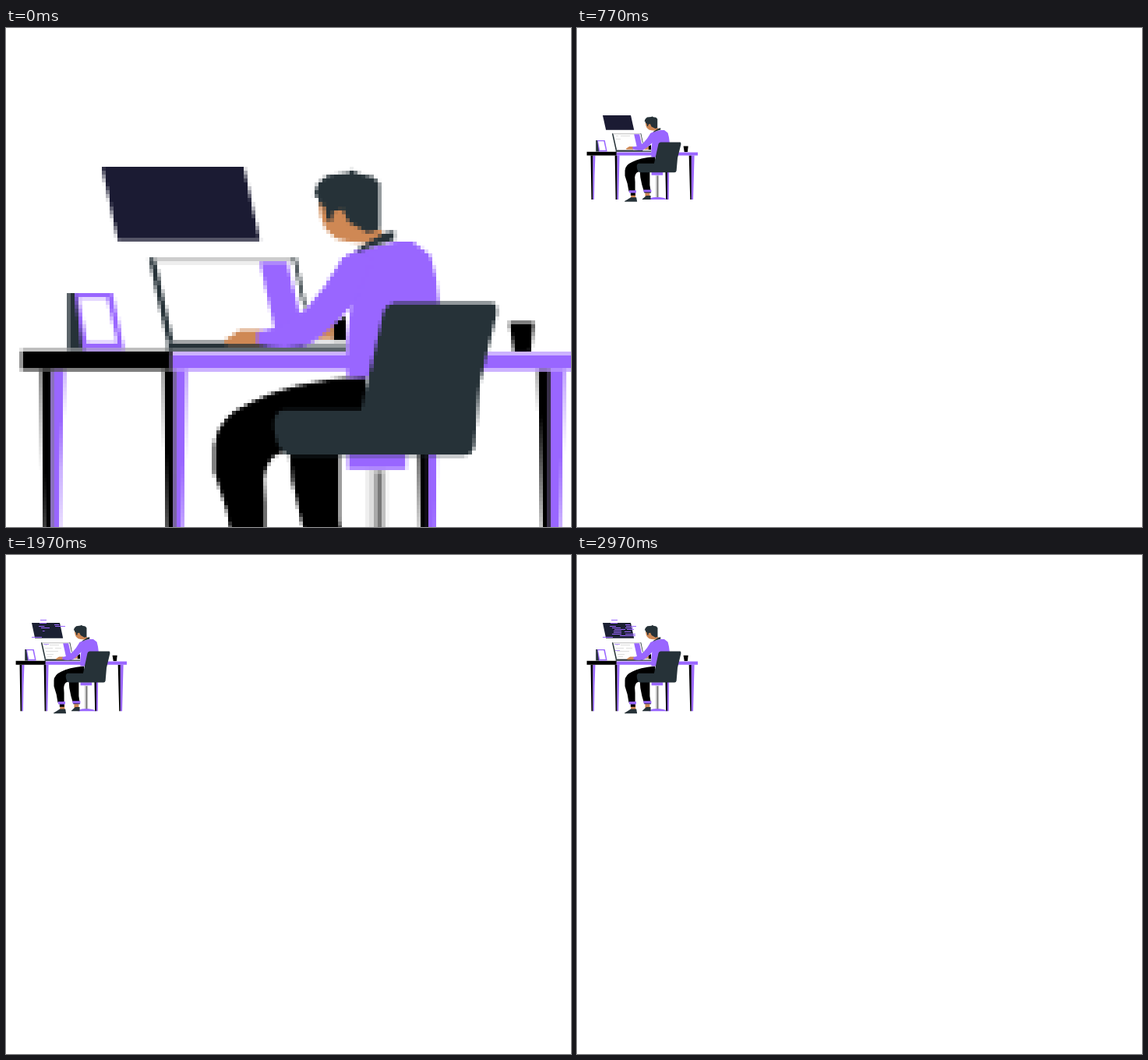
An HTML page with a canvas for the animation above (3.01 s loop, 725 by 640 pixels).

```html
<!DOCTYPE html>
<html lang="en">
<head>
<meta charset="utf-8">
<title>Working at a desk</title>
<style>
html, body { margin: 0; width: 100%; height: 100%; overflow: hidden; background: #fff; }
canvas { display: block; }
</style>
</head>
<body>
<canvas id="stage" width="725" height="640"></canvas>
<script>
const LOOP = 3010, CLOSE_UP = 30, LIFT = 1500;
const ZOOM = 5.05, OFF_X = 43.6, OFF_Y = 387.6;
const PURPLE = '#9966ff', DARK = '#263238', BLACK = '#000', SKIN = '#cf8854', NAVY = '#1b1b33';

const stage = document.getElementById('stage').getContext('2d');
const small = document.createElement('canvas');
small.width = 165;
small.height = 230;
const ctx = small.getContext('2d');

const fill = (color, d) => {
  ctx.fillStyle = color;
  ctx.fill(new Path2D(d));
};
const clamp = v => Math.max(0, Math.min(1, v));

// Shapes use close-up coordinates; once lifted, a group moves up and stretches from its anchor.
function group(lifted, anchor, rise, stretch, draw) {
  ctx.save();
  ctx.setTransform(1 / ZOOM, 0, 0, 1 / ZOOM, OFF_X / ZOOM, OFF_Y / ZOOM);
  if (lifted) {
    ctx.translate(0, anchor - rise);
    ctx.scale(1, stretch);
    ctx.translate(0, -anchor);
  }
  draw();
  ctx.restore();
}

// x, y, width in small pixels, start time
const codeLines = [
  [44, 83, 8, 1480], [33, 105, 13, 1480], [62, 89, 6, 1530],
  [43, 87, 9, 1620], [45, 93, 11, 1700], [63, 91, 13, 1780],
  [42, 91, 8, 1860], [47, 97, 10, 1940], [62, 101, 13, 2020],
  [53, 95, 9, 2100], [64, 95, 9, 2180], [61, 98, 8, 2260],
  [45, 101, 12, 2400], [62, 93, 10, 2500], [55, 103, 20, 2600],
  [47, 99, 10, 2700], [48, 95, 7, 2780]
];
const pageLines = [
  [56, 138, 12, 450], [50, 138, 3, 570], [50, 142, 10, 700], [63, 142, 8, 800],
  [51, 146, 16, 920], [52, 150, 9, 1100], [53, 153, 6, 1350]
];

function lines(list, t, color, shift = 0) {
  ctx.fillStyle = color;
  for (const [x, y, w, start] of list) {
    ctx.fillRect(x, y - shift, w * clamp((t - start) / 120), 1);
  }
}

function monitor(lifted) {
  group(lifted, 178, 126, 1.05, () =>
    fill(lifted ? '#1b2033' : NAVY, 'M123 178H305L326 273H144Z'));
}

function desk() {
  fill(BLACK, 'M45 438H60V723H50ZM202 438H217V723H207ZM527 438H542V723H533ZM682 438H698V723H690Z');
  fill(PURPLE, 'M60 438H75L70 570L67 723H60ZM217 438H232L225 723H217ZM542 438H554L551 723H542ZM698 438H717L709 723H698Z');
  fill(BLACK, 'M20 414H213V438H20Z');
  fill(PURPLE, 'M213 418H739V438H213Z');
}

function stool() {
  fill('#dddddd', 'M464 565H488V712H464Z');
  fill('#777777', 'M474 569H483V712H474Z');
  fill(PURPLE, 'M439 546H513V565H439ZM421 723Q430 710 464 708H490Q530 711 538 723Z');
}

function legs() {
  fill(SKIN, 'M398 680H428V704H398ZM306 683H336V714H306Z');
  fill(DARK, 'M380 720Q392 710 406 698H434V723H380ZM265 733Q285 724 305 710H341L346 737H265Z');
  fill(BLACK, 'M364 540H428V630L436 680H393Q375 630 367 580ZM304 670H334V697H304Z');
  fill(BLACK, 'M462 446Q360 455 315 480Q268 500 267 535V570L283 620L292 670H333V610L331 580Q334 550 352 545L462 490Z');
  fill(PURPLE, 'M387 660H438V676H389ZM293 664H340V681H296Z');
}

function deskItems() {
  fill(DARK, 'M79 339H92L102 413H79Z');
  fill(PURPLE, 'M88 339H137L152 413H98Z');
  fill('#fff', 'M93 346H130L143 404H104Z');
  fill(BLACK, 'M646 378H677L673 415H652Z');
}

function laptop() {
  fill('#fff', 'M188 298H370L390 404H212Z');
  fill(DARK, 'M183 295H191L215 404H207ZM364 295H372L386 362L380 352L369 301Z');
  fill('#bdbdbd', 'M190 295H368V300H190ZM213 400H320V404H213Z');
  fill(PURPLE, 'M326 300H361L385 404H349Z');
  fill(DARK, 'M207 404H438V414H207Z');
}

function farHand(k) {
  fill(BLACK, 'M417 380L436 370V402H420Z');
  fill('#f5f5f5', 'M382 402H438V408H382Z');
  const x = -12 * k;
  fill(SKIN, `M${398 + x} 399L${412 + x} 382L420 378V399Z`);
}

function body(k) {
  fill(PURPLE, 'M455 284L500 274H522L545 292L552 320L557 360L480 448H438V398L443 355L430 297Z');
  const dx = -12 * k, dy = -19 * k;
  fill(SKIN, `M${279 + dx} ${402 + dy}L${300 + dx} ${388 + dy}H${328 + dx}V${407 + dy}H${283 + dx}Z`);
  fill(PURPLE, `M455 284L432 296L410 330L${385 - 4 * k} 360L${348 + dx / 2} ${384 + dy * .7}L${322 + dx} ${390 + dy}V${405 + dy}` +
    `Q${350 + dx / 2} ${414 + dy * .6} ${385 - 2 * k} ${408 - 14 * k}Q410 ${395 - 12 * k} 446 353L470 300Z`);
}

function head(k) {
  ctx.save();
  ctx.translate(-3 * k, 4 * k);
  fill(SKIN, 'M401 224H425L455 245L482 260L484 266L465 276L440 274L424 270L410 257L404 243Z');
  fill(DARK, 'M400 200L412 189L440 186L444 182L452 187L470 190L479 200V258L465 262L440 249L432 232L420 235L418 248L412 246L409 229L401 225V218L395 215Z');
  ctx.restore();
  fill(DARK, 'M449 285L470 272L485 262L498 260V272L470 280L455 287Z');
}

function chair() {
  fill(DARK, 'M498 352H626Q631 354 630 366L608 455L601 537Q599 548 588 548H367Q347 546 344 512Q343 491 358 490H456L484 364Q487 353 498 352Z');
}

function drawScene(t) {
  const lifted = t >= LIFT;
  const k = (1 - Math.cos(t / LOOP * 6 * Math.PI)) / 2;
  const upper = draw => group(lifted, 415, 116, 1, draw);
  const lower = draw => group(lifted, 415, 116, 1.055, draw);

  ctx.clearRect(0, 0, small.width, small.height);
  ctx.fillStyle = '#fff';
  ctx.fillRect(0, 0, small.width, small.height);
  monitor(lifted);
  if (lifted) lines(codeLines, t, PURPLE);
  lower(() => { desk(); stool(); legs(); });
  upper(() => { deskItems(); laptop(); });
  const shift = lifted ? 23 : 0;
  lines(pageLines, t, '#dedede', shift);
  lines([[48, 137, 7, 950], [49, 145, 6, 2500]], t, '#b99aff', shift);
  upper(() => { farHand(k); body(k); head(k); });
  group(lifted, 350, 116, 1.03, chair);
}

const begin = performance.now();
function frame() {
  const t = Math.max(0, performance.now() - begin) % LOOP;
  drawScene(t);
  stage.fillStyle = '#fff';
  stage.fillRect(0, 0, 725, 640);
  stage.imageSmoothingEnabled = false;
  if (t < CLOSE_UP) {
    stage.drawImage(small, -OFF_X, -OFF_Y, small.width * ZOOM, small.height * ZOOM);
  } else {
    stage.drawImage(small, 0, 0);
  }
  requestAnimationFrame(frame);
}
frame();
</script>
</body>
</html>
```
